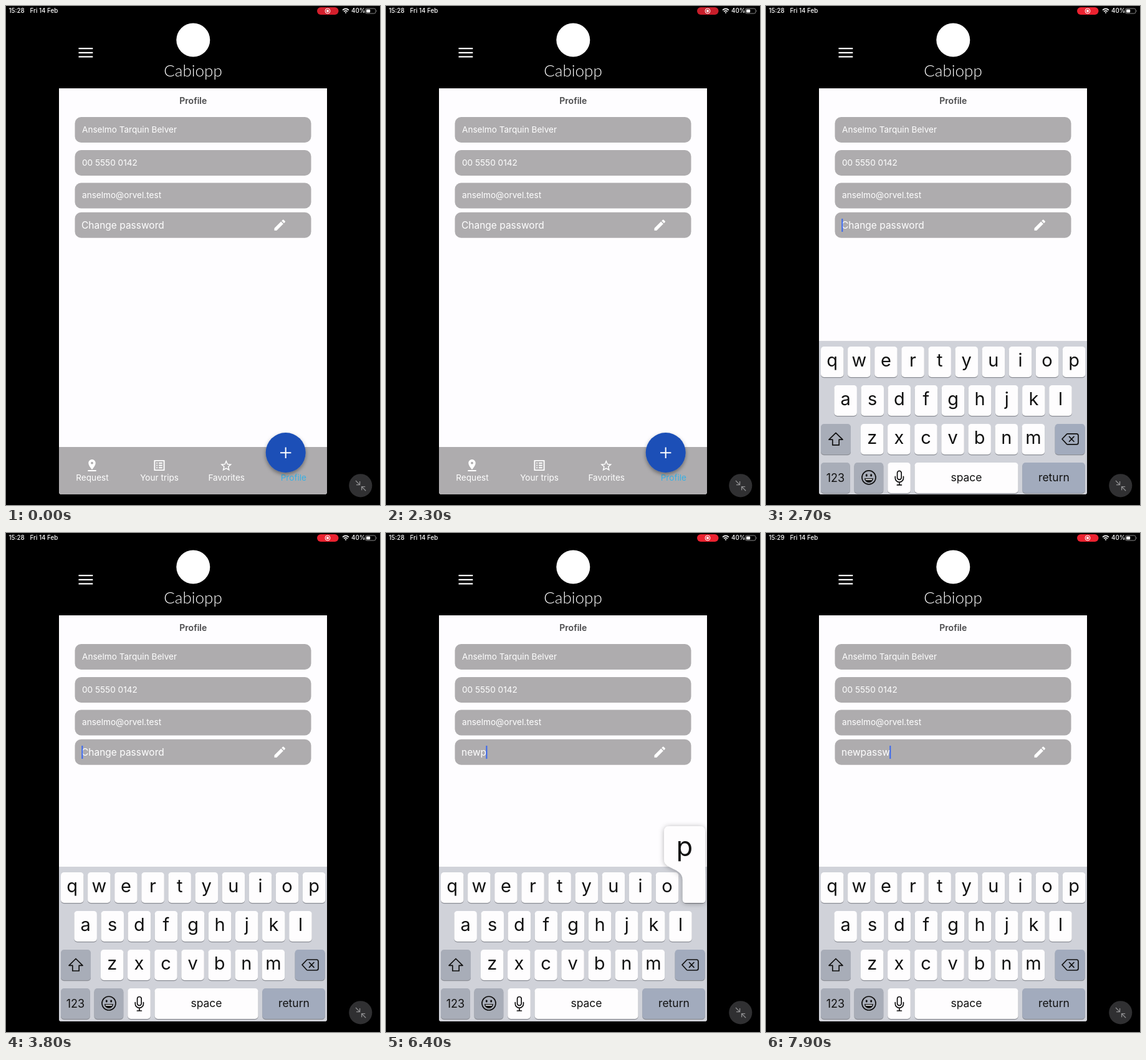
Animation, 600 px wide and 800 px high, one loop 8 s. Source, as an HTML page:

```html
<!DOCTYPE html>
<html lang="en">
<head>
<meta charset="utf-8">
<title>Profile password entry</title>
<style>
  html, body { margin: 0; width: 100%; height: 100%; overflow: hidden; background: #000; }
  svg { display: block; width: 600px; height: 800px; font-family: Inter, Roboto, sans-serif; }
  .mid { text-anchor: middle; }
  .line { fill: none; stroke: #111; stroke-width: 1.7; stroke-linejoin: round; stroke-linecap: round; }
</style>
</head>
<body>
<svg viewBox="0 0 600 800">
  <defs>
    <clipPath id="card"><path d="M85 132H515V779q0 4-4 4H89q-4 0-4-4Z"/></clipPath>
    <filter id="soft" x="-50%" y="-50%" width="200%" height="200%">
      <feDropShadow dx="0" dy="3" stdDeviation="3" flood-opacity=".4"/>
    </filter>
    <filter id="lift" x="-50%" y="-50%" width="200%" height="200%">
      <feDropShadow dx="0" dy="1" stdDeviation="4" flood-opacity=".3"/>
    </filter>
  </defs>

  <!-- status bar -->
  <g fill="#fff" font-size="9.8" font-weight="500">
    <text id="clock" x="4.5" y="11.2"></text>
    <text x="38.5" y="11.2">Fri 14 Feb</text>
    <text x="554" y="11.2">40%</text>
    <rect id="pill" x="499" y="2" width="34.5" height="12" rx="6"/>
    <circle cx="516" cy="8" r="4" fill="none" stroke="#fff"/>
    <circle cx="516" cy="8" r="2.1"/>
    <g fill="none" stroke="#fff" stroke-width="1.5">
      <path d="M540 6.6q5-4.4 10 0M542 8.9q3-2.6 6 0"/>
    </g>
    <path d="M543.5 10.4q1.5-1.3 3 0L545 12Z"/>
    <rect x="576.5" y="4" width="16.5" height="8" rx="2.4" fill="none" stroke="#8a8a8a"/>
    <rect x="578" y="5.5" width="6.2" height="5" rx="1"/>
    <path d="M594.3 6.5q1.6 1.5 0 3Z" fill="#8a8a8a"/>
  </g>

  <!-- app header -->
  <path d="M116.5 68.2h22.8M116.5 74.8h22.8M116.5 81.3h22.8" stroke="#fff" stroke-width="2.3"/>
  <circle cx="300.3" cy="54.5" r="27" fill="#fff"/>
  <text class="mid" x="300" y="113" fill="#fff" font-family="Lato, 'Open Sans', sans-serif" font-size="26" font-weight="300">Cabiopp</text>

  <g clip-path="url(#card)">
    <rect x="85" y="132" width="430" height="651" fill="#fefdff"/>
    <text class="mid" x="300.3" y="157" font-size="14" font-weight="600" fill="#48484a">Profile</text>
    <g id="fields"></g>
    <text id="entry" x="121" y="357" font-size="15.5" fill="#fff"></text>
    <rect id="caret" y="341" width="2" height="21" fill="#3a68f0"/>
    <path transform="translate(427.6 339.6) scale(.97)" fill="#fff" d="M3 17.25V21h3.75L17.81 9.94l-3.75-3.75L3 17.25zM20.71 7.04a1 1 0 0 0 0-1.41l-2.34-2.34a1 1 0 0 0-1.41 0l-1.83 1.83 3.75 3.75 1.83-1.83z"/>

    <!-- tab bar -->
    <rect x="85" y="707" width="430" height="76" fill="#aeacae"/>
    <g fill="#fff">
      <path transform="translate(126.6 725.1) scale(.95)" d="M18 8c0-3.31-2.69-6-6-6S6 4.69 6 8c0 4.5 6 11 6 11s6-6.5 6-11zm-8 0c0-1.1.9-2 2-2s2 .9 2 2-.89 2-2 2c-1.1 0-2-.9-2-2zM5 20v2h14v-2H5z"/>
      <path transform="translate(234.6 725.1) scale(.95)" d="M19 5v14H5V5h14m1.1-2H3.9c-.5 0-.9.4-.9.9v16.2c0 .4.4.9.9.9h16.2c.4 0 .9-.5.9-.9V3.9c0-.5-.5-.9-.9-.9zM11 7h6v2h-6V7zm0 4h6v2h-6v-2zm0 4h6v2h-6zM7 7h2v2H7zm0 4h2v2H7zm0 4h2v2H7z"/>
      <path transform="translate(342.2 726) scale(.92)" d="M22 9.24l-7.19-.62L12 2 9.19 8.63 2 9.24l5.46 4.73L5.82 21 12 17.27 18.18 21l-1.63-7.03L22 9.24zM12 15.4l-3.76 2.27 1-4.28-3.32-2.88 4.38-.38L12 6.1l1.71 4.04 4.38.38-3.32 2.88 1 4.28L12 15.4z"/>
    </g>
    <g id="tabs" class="mid" font-size="13.6"></g>
    <circle cx="448.7" cy="716" r="32" fill="#1a50b7" filter="url(#soft)"/>
    <path d="M440 716.2h17.4M448.7 707.5v17.4" stroke="#fff" stroke-width="2"/>

    <g id="board">
      <rect x="85" y="535" width="430" height="260" fill="#d0d2d9"/>
      <g id="keys"></g>
      <g class="mid" fill="#111" font-size="17.5">
        <text x="111.5" y="761" font-size="18">123</text>
        <text x="321.5" y="760">space</text>
        <text x="462" y="760">return</text>
      </g>
      <g class="line">
        <path d="M112 682.5L123 693.3H117.2V702H106.8V693.3H101Z"/>
        <path d="M475 692.3L482.5 684.5Q483 684 484 684H498q3 0 3 3V698q0 3-3 3H484q-1 0-1.5-.5ZM486.5 688.5l7.5 7.8m0-7.8l-7.5 7.8"/>
        <circle cx="165" cy="754" r="11"/>
        <rect x="210.6" y="743.5" width="6.6" height="14" rx="3.3"/>
        <path d="M207.3 752.5v2.3a6.6 6.6 0 0 0 13.2 0v-2.3M213.9 761.5v4.5m-3.5 0h7"/>
      </g>
      <g fill="#111">
        <ellipse cx="161.3" cy="750.5" rx="1.5" ry="2.1"/>
        <ellipse cx="168.7" cy="750.5" rx="1.5" ry="2.1"/>
        <path d="M157.8 755.3h14.4q-1 6.7-7.2 6.7t-7.2-6.7Z"/>
        <path d="M159.6 756.6h10.8l-.5 1.5h-9.8Z" fill="#fff"/>
      </g>
      <g id="popup">
        <path id="bubble" fill="#fefdfe" filter="url(#lift)"/>
        <text id="big" class="mid" font-size="43" fill="#111"></text>
      </g>
    </g>
  </g>

  <!-- floating corner button -->
  <circle cx="568.8" cy="768.8" r="18.6" fill="#303032"/>
  <path d="M561 761l6.6 6.6m-5.6 0h5.6v-5.6M577.2 777.2l-6.6-6.6m5.6 0h-5.6v5.6" fill="none" stroke="#909092" stroke-width="1.3"/>
</svg>

<script>
const $ = id => document.getElementById(id);
const LOOP = 8000, KEY_W = 36.5, KEY_H = 49, KEYBOARD_AT = 2320, FOCUS_AT = 2500;

const details = ['Anselmo Tarquin Belver', '00 5550 0142', 'anselmo@orvel.test', ''];
$('fields').innerHTML = details.map((label, i) => {
  const y = [178, 231, 283.5, 330.7][i];
  return `<rect x="110.5" y="${y}" width="379" height="41" rx="10" fill="#aeacae"/>
    <text x="122" y="${y + 24.8}" font-size="13.6" fill="#fff">${label}</text>`;
}).join('');

$('tabs').innerHTML = ['Request', 'Your trips', 'Favorites', 'Profile'].map((label, i) =>
  `<text x="${138.5 + 107.6 * i}" y="761" fill="${i < 3 ? '#fff' : '#38b0e4'}">${label}</text>`).join('');

const keyShape = (x, y, w, fill = '#fefdfe') =>
  `<rect x="${x}" y="${y + 1.3}" width="${w}" height="${KEY_H}" rx="5" fill="#8d8f96"/>
   <rect x="${x}" y="${y}" width="${w}" height="${KEY_H}" rx="5" fill="${fill}"/>`;

const spots = {};
let keys = '';
['qwertyuiop', 'asdfghjkl', 'zxcvbnm'].forEach((row, r) => [...row].forEach((ch, i) => {
  const x = [88, 109.4, 152][r] + 43.1 * i, y = 544 + 62 * r;
  spots[ch] = { x, y };
  keys += keyShape(x, y, KEY_W) +
    `<text class="mid" x="${x + KEY_W / 2}" y="${y + 32}" font-size="29" fill="#111">${ch}</text>`;
}));
const dark = '#a8adb8', blue = '#a2abbd';
$('keys').innerHTML = keys +
  keyShape(88, 668, 48, dark) + keyShape(463.6, 668, 48, blue) +
  keyShape(88, 730, 46.8, dark) + keyShape(141.5, 730, 46.8, dark) +
  keyShape(195.3, 730, 36.5) + keyShape(238.5, 730, 166) + keyShape(411.3, 730, 100.5, blue);

// Each press shows a bubble for 300 ms and types its letter after 200 ms.
const presses = [['n', 4800], ['e', 5300], ['w', 5700], ['p', 6200],
                 ['a', 6700], ['s', 7000], ['s', 7300], ['w', 7500]];

function bubblePath({ x, y }) {
  const left = Math.min(x - 15, 446), right = left + 66, top = y - 74, end = x + KEY_W;
  return `M${left + 9} ${top}H${right - 9}q9 0 9 9V${top + 53}
    C${right} ${top + 70} ${end} ${top + 66} ${end} ${top + 86}V${y + KEY_H - 5}q0 5-5 5
    H${x + 5}q-5 0-5-5V${top + 86}C${x} ${top + 66} ${left} ${top + 70} ${left} ${top + 53}
    V${top + 9}q0-9 9-9Z`;
}

function showPopup(t) {
  const press = presses.filter(([, at]) => at <= t && t < at + 300).pop();
  $('popup').style.display = press ? '' : 'none';
  if (!press) return;
  const spot = spots[press[0]];
  $('bubble').setAttribute('d', bubblePath(spot));
  $('big').textContent = press[0];
  $('big').setAttribute('x', Math.min(spot.x - 15, 446) + 33);
  $('big').setAttribute('y', spot.y - 26);
}

function showEntry(t) {
  const typed = presses.filter(([, at]) => at + 200 <= t);
  const entry = $('entry');
  entry.textContent = typed.map(p => p[0]).join('') || 'Change password';
  const width = typed.length ? entry.getComputedTextLength() - 1 : 0;
  const since = t - (typed.length ? typed[typed.length - 1][1] + 200 : FOCUS_AT);
  $('caret').setAttribute('x', 121.3 + width);
  $('caret').style.display = since >= 0 && since % 1000 < 600 ? '' : 'none';
}

function draw(t) {
  $('clock').textContent = t < 7600 ? '15:28' : '15:29';
  const dim = ((1 + Math.cos((t - 1080) / 1200 * 2 * Math.PI)) / 2) ** 4;
  $('pill').setAttribute('fill', `rgb(${236 - 36 * dim},${34 - 4 * dim},${48 - 6 * dim})`);

  // critically damped slide
  const s = Math.max(0, t - KEYBOARD_AT) * 0.01826;
  const drop = 250 * (1 + s) * Math.exp(-s);
  $('board').setAttribute('transform', `translate(0 ${drop.toFixed(2)})`);
  showPopup(t);
  showEntry(t);
}

const start = performance.now();
function frame() {
  const t = (performance.now() - start) % LOOP;
  draw(Math.floor(t / 100) * 100);
  requestAnimationFrame(frame);
}
frame();
</script>
</body>
</html>
```
